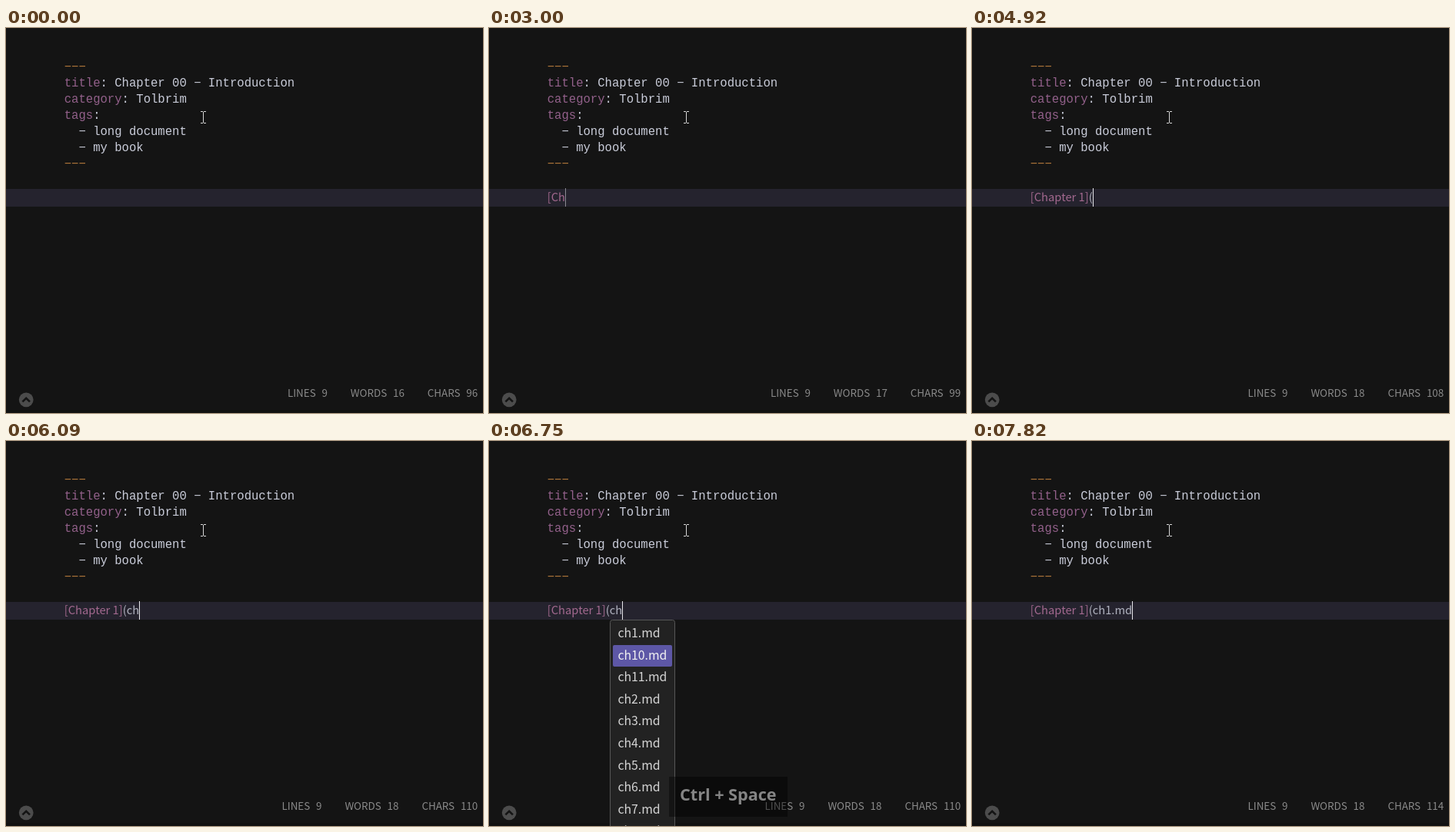
Write an HTML page with a canvas that moves like this. It is 620 px wide and 500 px high and loops after 8000 ms.

```html
<!DOCTYPE html>
<html lang="en">
<head>
<meta charset="utf-8">
<title>Markdown link completion</title>
<style>
html, body { margin: 0; width: 100%; height: 100%; overflow: hidden; background: #141414; }
canvas { display: block; }
</style>
</head>
<body>
<canvas id="stage" width="620" height="500"></canvas>
<script>
const ctx = document.getElementById('stage').getContext('2d', { alpha: false });

const LOOP = 8000;
const LEFT = 75.7;
const SANS = '"Noto Sans CJK JP", "Noto Sans CJK SC", "Noto Sans CJK", "Noto Sans", sans-serif';
const FONT = {
  mono: '15.6px "Liberation Mono", monospace',
  body: `14.72px ${SANS}`,
  status: `13.4px ${SANS}`,
  menu: `500 15.8px ${SANS}`,
  keys: 'bold 21.6px "Noto Sans", sans-serif'
};
const COLOR = {
  page: '#141414', line: '#25232e', text: '#c9ccd9', key: '#92608a', rule: '#b47a3c',
  link: '#a3698f', url: '#b0b2bf', status: '#8a8a8a', menu: '#222222', border: '#565656',
  pick: '#5d57a6', item: '#d6d6d6'
};

// The minus sign gives the long dashes of the editor font.
const HEADER = [
  ['−−−', ''],
  ['title', ': Chapter 00 − Introduction'],
  ['category', ': Tolbrim'],
  ['tags', ':'],
  ['', '  − long document'],
  ['', '  − my book'],
  ['−−−', '']
];
const FILES = Array.from({ length: 11 }, (_, i) => `ch${i + 1}.md`).sort();

// Menu: opened, one step down, back up, accepted.
const OPEN = 6190, DOWN = 6750, UP = 7260, ACCEPT = 7820;

// Start of each burst and the text added by each key press in it.
const BURSTS = [
  [1930, '['], [2490, 'C'], [2950, 'h', 'a', 'p'], [3250, 't'], [3560, 'e', 'r', ' '],
  [3910, '1', ']'], [4520, '('], [5890, 'ch'], [ACCEPT, '1.md']
];
const PACE = 75;
const BLINK = 460;
const PRESSES = BURSTS.flatMap(([start, ...keys]) =>
  keys.map((text, i) => ({ time: start + i * PACE, text })));
const RESETS = [50 - 2 * BLINK, DOWN, UP, ...PRESSES.map(p => p.time)];

const typedAt = t => PRESSES.filter(p => p.time <= t).map(p => p.text).join('');

// The caret blinks anew after every key press.
function caretOn(t) {
  const last = Math.max(...RESETS.filter(time => time <= t));
  return Math.floor((t - last) / BLINK) % 2 === 0;
}

function rect(x, y, w, h, color) {
  ctx.fillStyle = color;
  ctx.fillRect(x, y, w, h);
}

function roundRect(x, y, w, h, r, fill, stroke) {
  ctx.beginPath();
  ctx.roundRect(x, y, w, h, r);
  ctx.fillStyle = fill;
  ctx.fill();
  if (stroke) {
    ctx.strokeStyle = stroke;
    ctx.lineWidth = 1;
    ctx.stroke();
  }
}

// Returns the x where the text ends.
function write(text, x, y, font, color) {
  ctx.font = font;
  ctx.fillStyle = color;
  ctx.fillText(text, x, y);
  return x + ctx.measureText(text).width;
}

function drawHeader() {
  HEADER.forEach(([key, rest], i) => {
    const y = 55 + i * 21;
    const x = write(key, LEFT, y, FONT.mono, rest ? COLOR.key : COLOR.rule);
    write(rest, x, y, FONT.mono, COLOR.text);
  });
}

function drawLink(typed, t) {
  rect(0, 209, 620, 23, COLOR.line);
  const split = typed.indexOf('(');
  const label = split < 0 ? typed : typed.slice(0, split);
  let x = write(label, LEFT, 225, FONT.body, COLOR.link);
  x = write(typed.slice(label.length), x, 225, FONT.body, COLOR.url);
  const color = label && split < 0 ? '#8b8a92' : '#e6e6ea';
  if (caretOn(t)) rect(Math.floor(x + 0.3), 208, 1, 24, color);
}

function drawPointer() {
  const color = '#d8d8d8';
  rect(256, 109, 1, 14, color);
  for (const y of [108, 123]) {
    rect(253, y, 3, 1, color);
    rect(257, y, 3, 1, color);
  }
}

// Laid out from the right edge.
function drawStatus(typed) {
  const words = 16 + typed.split(' ').filter(Boolean).length;
  let x = 613.2;
  const put = (text, gap) => {
    ctx.font = FONT.status;
    x -= ctx.measureText(text).width;
    write(text, x, 479, FONT.status, COLOR.status);
    x -= gap;
  };
  for (const [label, value] of [['CHARS', 96 + typed.length], ['WORDS', words], ['LINES', 9]]) {
    put(String(value), 7.8);
    put(label, 30);
  }
}

function drawTopButton() {
  ctx.beginPath();
  ctx.arc(26.2, 482.8, 9.4, 0, Math.PI * 2);
  ctx.fillStyle = '#4c4c4c';
  ctx.fill();
  ctx.beginPath();
  ctx.moveTo(21.4, 485.4);
  ctx.lineTo(26.2, 480.7);
  ctx.lineTo(31, 485.4);
  ctx.strokeStyle = COLOR.page;
  ctx.lineWidth = 2.6;
  ctx.stroke();
}

function drawMenu(pick) {
  roundRect(157.5, 232.5, 84, 290, 3, COLOR.menu, COLOR.border);
  FILES.forEach((name, i) => {
    const y = i * 28.6;
    if (i === pick) roundRect(161, Math.round(236 + y), 77, 28, 2, COLOR.pick);
    write(name, 167.4, Math.round(255 + y), FONT.menu, i === pick ? '#f2f2f2' : COLOR.item);
  });
}

function drawKeys(alpha) {
  ctx.globalAlpha = alpha;
  rect(234, 436, 154, 52, 'rgba(0, 0, 0, 0.85)');
  write('Ctrl + Space', 248, 467, FONT.keys, '#ffffff');
  ctx.globalAlpha = 1;
}

function draw(t) {
  const typed = typedAt(t);
  const stepped = t >= DOWN && t < UP;
  rect(0, 0, 620, 500, COLOR.page);
  rect(0, 496, 620, 4, '#111111');
  drawHeader();
  drawLink(typed, t);
  drawStatus(typed);
  drawTopButton();
  if (t >= OPEN && t < ACCEPT) drawMenu(stepped ? 1 : 0);
  if (t >= OPEN && t < UP) drawKeys(stepped ? 0.5 : 1);
  drawPointer();
}

const begin = performance.now();
function tick() {
  draw((performance.now() - begin) % LOOP);
  requestAnimationFrame(tick);
}
tick();
</script>
</body>
</html>
```
